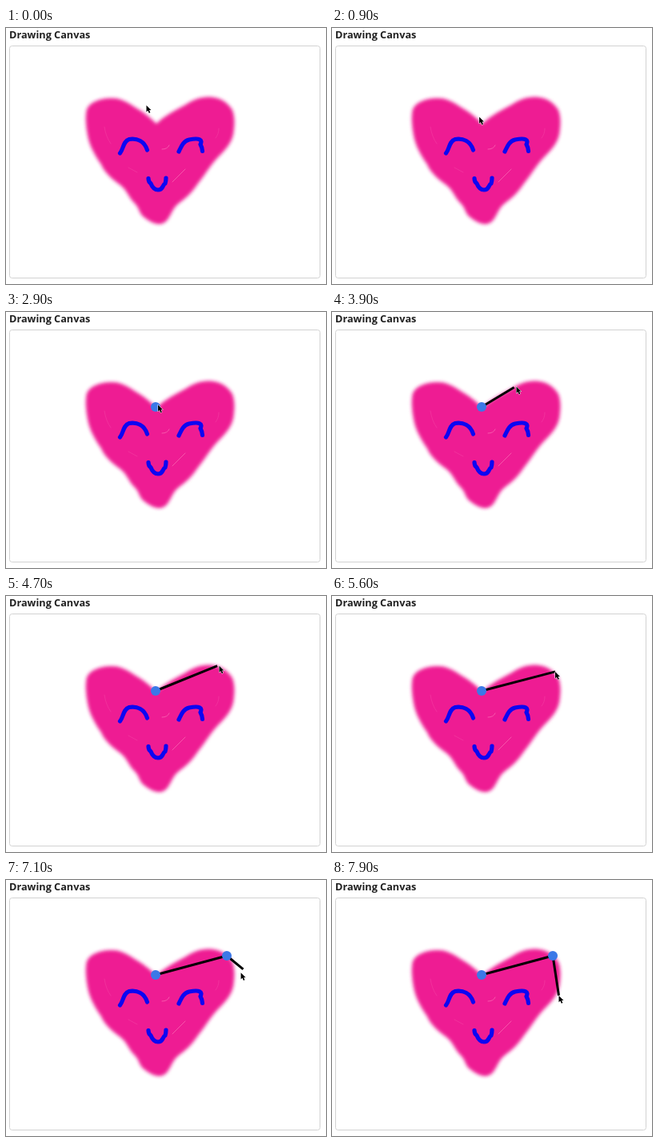
These frames come from a looping animation (400 px wide and 321 px high, 8 s). An HTML page:

```html
<!DOCTYPE html>
<html lang="en">
<head>
<meta charset="utf-8">
<title>Drawing Canvas</title>
<style>
  html, body { margin: 0; width: 100%; height: 100%; overflow: hidden; background: #fff; }
  svg { display: block; width: 400px; height: 321px; }
  .title { font: 700 12.7px "Open Sans", sans-serif; fill: #212121; }
  .face { fill: none; stroke: #0c06f2; stroke-width: 5.2; stroke-linecap: round; stroke-linejoin: round; }
  .crease { fill: none; stroke: #f757ac; stroke-width: 1; stroke-linecap: round; }
  .edge { stroke: #000; stroke-width: 3; }
  .node { fill: #3b78e7; }
</style>
</head>
<body>
<svg viewBox="0 0 400 321">
  <defs>
    <filter id="soft" x="-10%" y="-10%" width="120%" height="120%"><feGaussianBlur stdDeviation="2.1"/></filter>
    <filter id="slight" x="-10%" y="-20%" width="120%" height="140%"><feGaussianBlur stdDeviation="0.55"/></filter>
  </defs>
  <text class="title" x="4" y="12.5">Drawing Canvas</text>
  <rect x="4.5" y="22.5" width="388" height="291" rx="3" fill="#fff" stroke="#d2d2d2"/>
  <path fill="#ee1c93" filter="url(#soft)" d="M188 120
    C198 110 212 103 223 97 C234 90 243 86 255 86.5 C268 87 278 94 283 103
    C286 111 286 120 284.5 131 C283 143 275 152 267 160 C256 171 249 184 240 195
    C234 204 227 212 217 219 C209 225 208 231 204 237 C201 243 196 246 191 246
    C183 245 177 241 171 236 C166 231 167 226 161 220 C153 212 151 203 143 197
    C132 189 123 181 119 171 C112 161 105 149 102.500 137 C100 124 99 113 100.500 104
    C103 93 118 88 131 88 C144 87 155 95 164 101 C174 107 181 113 188 120Z"/>
  <g class="crease" filter="url(#slight)">
    <path d="M195 152 Q202 152 204 147"/>
    <path d="M208 193 L224 177"/>
    <path opacity=".35" d="M123 124 Q125 137 131 145 M266 126 Q266 133 262 138 M153 175 L164 181"/>
  </g>
  <g class="face" filter="url(#slight)">
    <path d="M142.500 157 C147 152 146 142 154 139.500 C164 138 173 142 176.500 153"/>
    <path d="M216 155 C219 149 221 142 229 140 C242 137.500 246 140 243 146 Q245 149 245.500 154.500"/>
    <path d="M178 188.500 Q178 193 181 195 C183 200 186 203 190 203 C197 203 195 197 199 195 Q200 192 200 188"/>
  </g>
  <line id="edge1" class="edge"/>
  <line id="edge2" class="edge"/>
  <circle id="node1" class="node" r="6"/>
  <circle id="node2" class="node" r="6"/>
  <path id="cursor" d="M0 0 V8.300 L1.900 6.600 L3.300 9.700 L4.900 9 L3.500 6 H6Z"
    fill="#000" stroke="#fff" stroke-width="1" paint-order="stroke"/>
</svg>
<script>
const LOOP = 8000, STEP = 100, LAG = 70;
const FIRST = { at: 2300, x: 187, y: 119 };
const SECOND = { at: 6100, x: 276, y: 95 };

// Pointer path: time, x, y
const path = [
  [0, 175.5, 97], [300, 176, 98], [1300, 188, 118], [2700, 188, 118],
  [3900, 230.5, 93.5], [4700, 266.5, 87.5], [5200, 279, 93], [5600, 279, 95],
  [5900, 276, 95], [6500, 276, 95], [6950, 298, 108], [7250, 288, 125],
  [7700, 283.5, 143], [7900, 283.5, 145], [8000, 283.5, 145]
];
const el = id => document.getElementById(id);
const set = (node, attrs) => { for (const k in attrs) node.setAttribute(k, attrs[k]); };

const slope = (i, axis) => (path[i + 1][axis] - path[i][axis]) / (path[i + 1][0] - path[i][0]);

// Zero at turning points, so pauses stay still
function tangent(i, axis) {
  if (i === 0 || i === path.length - 1) return 0;
  const a = slope(i - 1, axis), b = slope(i, axis);
  return a * b <= 0 ? 0 : 2 * a * b / (a + b);
}

function pointer(t) {
  let i = 0;
  while (i < path.length - 2 && t >= path[i + 1][0]) i++;
  const span = path[i + 1][0] - path[i][0];
  const u = Math.max(0, (t - path[i][0]) / span), v = 1 - u;
  return [1, 2].map(axis =>
    v * v * (1 + 2 * u) * path[i][axis] + u * u * (3 - 2 * u) * path[i + 1][axis] +
    span * u * v * (v * tangent(i, axis) - u * tangent(i + 1, axis)));
}

const show = (node, visible) => set(node, { visibility: visible ? "visible" : "hidden" });

function draw(t) {
  const [x, y] = pointer(t);
  const [endX, endY] = pointer(t - LAG);
  const firstSet = t >= FIRST.at, secondSet = t >= SECOND.at;
  set(el("cursor"), { transform: `translate(${x} ${y})` });
  set(el("edge1"), {
    x1: FIRST.x, y1: FIRST.y,
    x2: secondSet ? SECOND.x : endX, y2: secondSet ? SECOND.y : endY
  });
  set(el("edge2"), { x1: SECOND.x, y1: SECOND.y, x2: endX, y2: endY });
  show(el("edge1"), firstSet);
  show(el("node1"), firstSet);
  show(el("edge2"), secondSet);
  show(el("node2"), secondSet);
}

set(el("node1"), { cx: FIRST.x, cy: FIRST.y });
set(el("node2"), { cx: SECOND.x, cy: SECOND.y });

const start = performance.now();
function tick() {
  const t = (performance.now() - start) % LOOP;
  draw(Math.floor(t / STEP) * STEP);
  requestAnimationFrame(tick);
}
tick();
</script>
</body>
</html>
```
